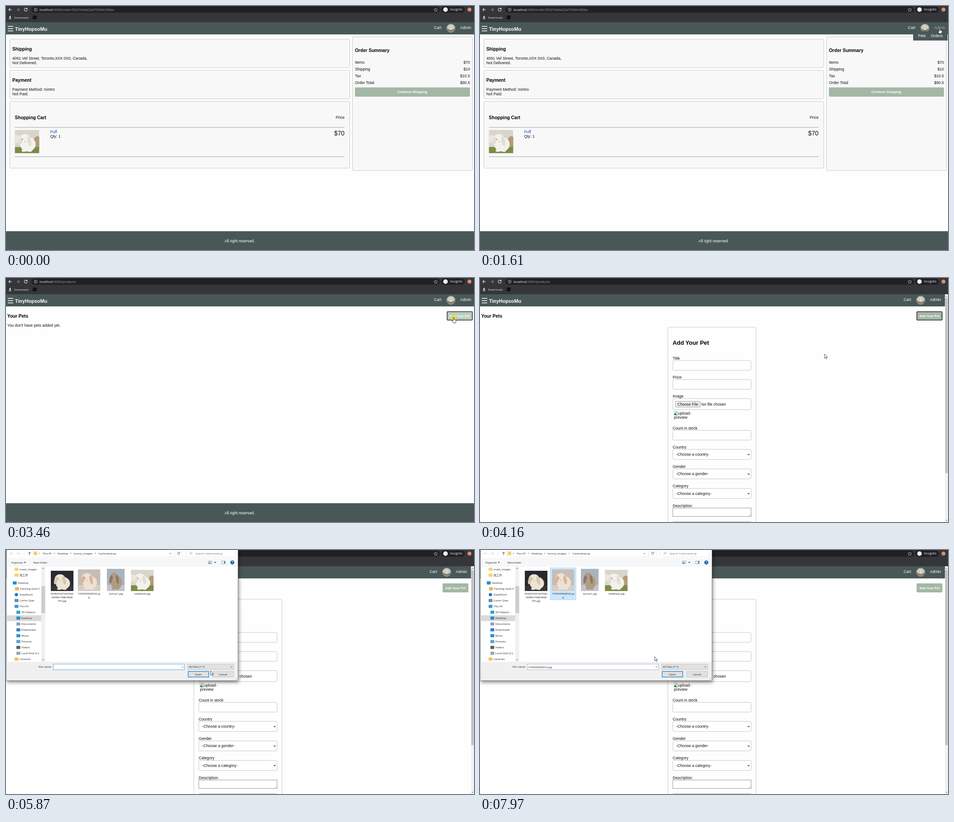
Write an HTML page that moves like this. It is 1034 px wide and 541 px high and loops after 8000 ms.

```html
<!DOCTYPE html>
<html lang="en">
<head>
<meta charset="utf-8">
<title>Pet shop admin walkthrough</title>
<style>
  html, body { margin: 0; width: 100%; height: 100%; overflow: hidden; background: #fefefe; }
  svg { display: block; }
  #stage { width: 100vw; height: 100vh; }
  text { font-family: "Liberation Sans", Arial, sans-serif; white-space: pre; }
  .ui { font-family: "Open Sans", "Noto Sans", "Noto Sans CJK SC", sans-serif; }
  #dialog { filter: drop-shadow(1px 3px 4px #0008); }
</style>
</head>
<body>
<svg id="stage" viewBox="0 0 1034 541" preserveAspectRatio="none"></svg>
<script>
const LOOP = 8000, TICK = 77.5;
const BODY = 8.62, H3 = 10.08, SMALL = 7.18;
const SLATE = '#495857', SAGE = '#a3b7a5';

// Markup helpers
const rect = (x, y, w, h, fill, more = '') =>
  `<rect x="${x}" y="${y}" width="${w}" height="${h}" fill="${fill}" ${more}/>`;
const box = (x, y, w, h, fill, stroke, r = 0, sw = .6) =>
  rect(x, y, w, h, fill, `stroke="${stroke}" stroke-width="${sw}" rx="${r}"`);
const text = (x, y, str, size = BODY, fill = '#111', more = '') =>
  `<text x="${x}" y="${y}" font-size="${size}" fill="${fill}" ${more}>${str}</text>`;
const bold = (x, y, str, size = H3, fill = '#000', more = '') =>
  text(x, y, str, size, fill, 'font-weight="700" ' + more);
const ui = (x, y, str, size = 6.1, fill = '#222', more = '') =>
  text(x, y, str, size, fill, 'class="ui" ' + more);
const line = (d, stroke, w = 1, more = '') =>
  `<path d="${d}" fill="none" stroke="${stroke}" stroke-width="${w}" ${more}/>`;
const shape = (d, fill, more = '') => `<path d="${d}" fill="${fill}" ${more}/>`;
const circle = (x, y, r, fill, more = '') => `<circle cx="${x}" cy="${y}" r="${r}" fill="${fill}" ${more}/>`;
const oval = (x, y, rx, ry, fill, turn = 0) =>
  `<ellipse cx="${x}" cy="${y}" rx="${rx}" ry="${ry}" fill="${fill}" transform="rotate(${turn} ${x} ${y})"/>`;
const group = (id, ...parts) => `<g id="${id}">${parts.join('')}</g>`;
const END = 'text-anchor="end"', MID = 'text-anchor="middle"';
const chevron = (x, y, color = '#444', w = .9) => line(`M${x - 2} ${y - 1}l2 2 2-2`, color, w);

// Flat rabbit picture on a 54 x 52 canvas
const photo = (x, y, w, h, back, floor, fur, shade, extra = '') =>
  `<svg x="${x}" y="${y}" width="${w}" height="${h}" viewBox="0 0 54 52" preserveAspectRatio="none">` +
  rect(0, 0, 54, 52, back) + extra + rect(0, 38, 54, 14, floor) +
  oval(29, 32, 17, 16, fur) + oval(22, 22, 13, 13, fur) +
  oval(12, 25, 4, 10, shade, 15) + oval(32, 25, 4, 11, shade, -12) +
  oval(20, 46, 5, 3, fur) + oval(33, 46, 5, 3, fur) +
  circle(17, 21, 1, '#544') + oval(22, 26, 1.5, 1, '#c9a79c') + '</svg>';
const whiteRabbit = (x, y, w, h) => photo(x, y, w, h, '#d8d5cb', '#7d8b45', '#f3f1ec', '#e2ded5',
  oval(50, 28, 9, 14, '#b49a78') + oval(5, 20, 9, 9, '#e8e6df'));

const browserBar = () => rect(0, 0, 1034, 36, '#35363a') +
  rect(56, 1, 903, 14, '#202124', 'rx="7"') + rect(961, 1, 53, 14, '#202124', 'rx="7"') +
  line('M13 8H6m3.4-3.4L6 8l3.4 3.4', '#e8eaed', 1.1) +
  line('M23 8h7m-3.4-3.4L30 8l-3.4 3.4', '#85868a', 1.1) +
  line('M46.3 5.8a3.4 3.4 0 1 0 .7 3.2', '#e8eaed', 1.1) + shape('M47.4 4v3.4H44z', '#e8eaed') +
  circle(65.5, 8, 3.3, 'none', 'stroke="#dadce0" stroke-width=".8"') + line('M65.5 7.3v2.5m0-4v.9', '#dadce0', .8) +
  shape('M949.5 4.2l1.2 2.7 3 .3-2.2 2 .6 2.9-2.6-1.5-2.6 1.5.6-2.9-2.2-2 3-.3z', 'none', 'stroke="#dadce0" stroke-width=".7"') +
  circle(971, 8, 5, '#f1f3f4') + ui(981, 10.3, 'Incognito', 6.3, '#f1f3f4') + circle(1024, 8, 4.4, '#e58a6c') +
  shape('M8 22h2v2.6h1.8L9 27.4 6.2 24.6H8zM6 28h6v1H6z', '#e8eaed') +
  ui(18, 27.7, 'Downloads', 6.12, '#e8eaed') + rect(59, 21, 8.5, 8.5, '#111');
const address = (id, path) => group(id,
  ui(74, 10.7, `<tspan fill="#f1f3f4">localhost</tspan>:3000/${path}`, 7.15, '#9aa0a6'));

const navRight = () => group('navRight',
  text(945.5, 51.3, 'Cart', BODY, '#fff'),
  circle(983, 49.2, 9.6, '#b9b7ae') + oval(983, 52, 8.7, 5.6, '#827e70') + oval(983, 48, 7, 5, '#d9d7d0') +
  circle(980, 48, .8, '#555') + circle(986, 48, .8, '#555'),
  text(1003.5, 51.3, 'Admin', BODY, '#fff', 'id="admin"'));

const card = (x, y, w, h) => box(x, y, w, h, '#f8f8f8', '#bcbcbc', 2.7, .8);
const summaryRow = (label, price, i) =>
  text(771, 127.8 + 15.1 * i, label) + text(1025, 127.8 + 15.1 * i, price, BODY, '#111', END);
const orderPage = () => group('orderPage',
  card(8.5, 73.5, 751, 63), card(8.5, 142.5, 751, 63.5), card(8.5, 211.5, 751, 148), card(765.5, 68.5, 265, 296.5),
  bold(14, 99, 'Shipping'), text(14, 119, '4091 Vel Street, Toronto,X0X 0X0, Canada,'), text(14, 128.8, 'Not Delivered.'),
  bold(14, 167.8, 'Payment'), text(14, 188.2, 'Payment Method: mintro'), text(14, 198, 'Not Paid.'),
  bold(19.5, 251, 'Shopping Cart'), text(748, 250.3, 'Price', BODY, '#111', END),
  line('M19.5 269.2H748M19.5 334.2H748', '#777', .7),
  whiteRabbit(19.5, 275, 54, 51.5),
  text(97.5, 282.4, 'Puff', BODY, '#1a45c4'), text(97.5, 292.2, 'Qty: 1'),
  text(748, 287.2, '$70', 13.79, '#111', END),
  bold(771, 102, 'Order Summary'),
  [['Items', '$70'], ['Shipping', '$10'], ['Tax', '$10.5'], ['Order Total', '$90.5']]
    .map(([label, price], i) => summaryRow(label, price, i)).join(''),
  rect(771, 180.5, 254, 20.5, SAGE, 'rx="2"'),
  bold(897.7, 193.2, 'Continue Shopping', SMALL, '#fff', MID));

const loading = () => {
  const ink = `stroke="${SAGE}" stroke-width="1.5" stroke-linecap="round"`;
  return group('loading',
    shape('M461 246.5V152q0-3 3-3h63q3 0 3 3v94.5z', '#a8bba9'),
    ui(468, 190.5, 'Loading', 15, '#fff'),
    shape('M531 246C526 220 530 203 540 208L570 208C576 216 582 230 586 246z', '#fefefe'),
    shape('M530 184C534 170 550 166 561 171C571 177 566 186 572 190C576 199 570 211 550 212L536 208z', '#fefefe', ink),
    shape('M532 180C524 197 518 222 513 237C511 247 524 249 531 239C540 225 544 206 538 187', '#fefefe', ink),
    line('M552 195q3 2 5-1M564 190l3-2M549 217q7 7 13 3q4-6-10-2M567 209q6 7 2 9M571 211q10 6 10 21q7 0 4 14M533 238q0 5 3 8M565 242q5-10 10-5q-5 4-4 9M578 246q4-11 9-14', SAGE, 1.3));
};

const addButton = () => group('addButton',
  rect(974, 74, 57, 20, SAGE, 'rx="2" id="addFace"'),
  bold(1002.3, 86.7, 'Add Your Pet', SMALL, '#fff', MID),
  box(974.6, 74.6, 55.8, 18.8, 'none', '#111', 1.5, 1.3).replace('<rect', '<rect id="addFocus"'));

const field = (label, y, h, content = '') =>
  text(425.7, y - 2.3, label) + box(426, y, 173, h, '#fff', '#b5b5b5', 2.4, .8) + content;
const select = (label, y, hint) => field(label, y, 22.3, text(433.5, y + 14, hint) + chevron(593.5, y + 11.5, '#222', 1.2));
const formPage = () => group('formPage',
  rect(0, 495, 1034, 46, '#fefefe'),
  box(415, 109.2, 195, 450, '#fefefe', '#bcbcbc', 2.7, .8),
  bold(425.5, 148.3, 'Add Your Pet', 12.92),
  field('Title', 183, 21.5), field('Price', 225.3, 21.5),
  field('Image', 267.5, 24.5, box(432, 273.4, 54.5, 12.8, '#efefef', '#777', 1, .7).replace('<rect', '<rect id="chooseFile"') +
    text(436, 282.7, 'Choose File') + text(489, 282.7, 'No file chosen')),
  box(428.7, 295.3, 8, 9, '#eef4fb', '#999', 0, .6), shape('M429 304v-3l3-2.5 4 5.5z', '#4f9a4a'), circle(434.3, 297.8, 1.2, '#7eb1e0'),
  text(437.5, 302.8, 'upload-'), text(428.5, 312.2, 'preview'),
  field('Count in stock', 337.8, 21.5),
  select('Country', 379.9, '-Choose a country-'), select('Gender', 423.2, '-Choose a gender-'),
  select('Category', 466.5, '-Choose a category-'),
  text(425.7, 507.5, 'Description'), box(426, 510, 173, 18.8, '#fff', '#777', 0, .8), line('M594 527.5l4-4m-2 4l2-2', '#777', .5),
  rect(426, 540, 173, 20, SAGE, 'rx="2"'),
  rect(1027.3, 36, 6.7, 505, '#f1f1f1'), rect(1028, 44.5, 5.4, 388, '#c1c1c1'),
  shape('M1029 41.5l1.7-2 1.7 2zM1029 536.5l1.7 2 1.7-2z', '#555'));

const places = [
  [19, 'mask_images', '#f5d36b'], [19, '找工作', '#f5d36b'], [15, 'Desktop', '#1e8fd8'],
  [20, 'Painting Vault F', '#e8b64c'], [19, 'DataPerch', '#1573c9'], [19, 'Lumin Qiao', '#6b8f9b'],
  [19, 'This PC', '#3d9bdc'], [23, '3D Objects', '#2fa3d6'], [23, 'Desktop', '#1e8fd8'],
  [23, 'Documents', '#8fa3b3'], [23, 'Downloads', '#2c7fd0'], [23, 'Music', '#2f8fdc'],
  [23, 'Pictures', '#5a9fd0'], [23, 'Videos', '#5b6068'], [23, 'Local Disk (C:)', '#9aa5ad'], [19, 'Libraries', '#efc44f']];
const sidebar = () => rect(1, 144.8, 77, 12.8, '#d9d9d9') + places.map(([x, name, color], i) => {
  const y = 42.8 + 13 * i + (i > 1 ? 4.2 : 0);
  const icon = name === 'DataPerch' ? circle(x + 4, y, 3.6, color) : rect(x, y - 3.5, 8.5, 7, color, 'rx=".8"');
  return icon + ui(x + 11, y + 2.2, name);
}).join('') +
  rect(78, 37, 8.5, 211, '#f0f0f0') + rect(78, 80, 8.5, 60, '#cdcdcd') +
  line('M80 42l2-2 2 2M80 242l2 2 2-2', '#555', .9);
const caption = (x, lines) => lines.map((s, i) => ui(x, 99.2 + 8.1 * i, s, 5.85, '#222', MID)).join('');
const dialog = () => group('dialog',
  box(1, -3, 511.5, 292.3, '#fff', '#777', 0, .8),
  line('M16 7.5H9m3-3-3 3 3 3M23 7.5h7m-3-3 3 3-3 3', '#ccc', .9), chevron(41, 7.5, '#ccc'),
  line('M52 11.5V4.5m-3 3 3-3 3 3', '#444', 1),
  box(59.5, -3, 330, 18.5, '#fff', '#d9d9d9'), rect(61.5, 3.5, 7.5, 8, '#f2cf65', 'rx=".8"'),
  [74, 107.5, 143.5, 197].map(x => line(`M${x - 1} 5.8l1.7 1.8-1.7 1.8`, '#555', .8)).join(''),
  ui(81, 9.8, 'This PC'), ui(114, 9.8, 'Desktop'), ui(150, 9.8, 'bunny_images'), ui(204, 9.8, 'CashmereLop'),
  chevron(363.5, 7.8), line('M372.5 0v15.5', '#d9d9d9', .7), line('M383 5.7a2.6 2.6 0 1 0 .8 2m.2-3.3v2h-2', '#444', .8),
  box(397, -3, 109, 18.5, '#fff', '#d9d9d9'), circle(409, 6.7, 2, 'none', 'stroke="#888" stroke-width=".7"'),
  line('M407.5 8.3l-2.5 2.5', '#888', .7), ui(419, 9.8, 'Search CashmereLop', 6.06, '#6d6d6d'),
  rect(1.5, 18, 510.5, 19, '#f6f7f8'), ui(11.5, 29.7, 'Organize'), ui(60.5, 29.7, 'New folder'),
  shape('M39.5 26.5h4.6l-2.3 2.6zM460 26.5h4.6l-2.3 2.6z', '#333'),
  box(447, 24.5, 7.5, 6, '#dcebf5', '#678'), rect(448.5, 27, 3, 3, '#3b8bc9'),
  box(476.5, 24.5, 8, 6, '#fff', '#678'), rect(481.5, 24.5, 3, 6, '#5b90bd'),
  circle(500, 27.6, 4.4, '#1560b8'), ui(500, 30, '?', 6.4, '#fff', 'text-anchor="middle" font-weight="700"'),
  sidebar(),
  rect(155, 39.5, 57, 71, '#e5f3ff', 'id="fileTile"'),
  photo(99, 46, 50, 45, '#292a30', '#35353a', '#ece5d6', '#d6c7a8'),
  photo(158.5, 43, 50, 48, '#c4bdb8', '#d5cec7', '#eee0d2', '#d9b797'),
  photo(223, 41.5, 39, 49.5, '#a9b4bf', '#c3c5c8', '#b19b85', '#8f7761'),
  whiteRabbit(276, 44, 50, 47),
  caption(124, ['854655437e935d2', 'd4960c768b38d6', '5f3.jpg']), caption(183.5, ['1595569008542.jp', 'g']),
  caption(243, ['bunny1.jpg']), caption(301.5, ['sddefault.jpg']),
  rect(1.5, 248, 510.5, 41, '#f0f0f0'),
  ui(101, 261.3, 'File name:', 6.1, '#222', END),
  box(104.3, 253, 290.4, 12.5, '#fff', '#0078d7').replace('<rect', '<rect id="nameBox"'), chevron(390, 259.5),
  ui(106, 261.6, '1595569008542.jpg', 5.82, '#222', 'id="fileName"'),
  box(401.5, 253, 101.5, 12, '#e1e1e1', '#adadad'), ui(404, 261.3, 'All Files (*.*)'), chevron(498, 259.3),
  box(402.5, 269.3, 45.5, 12.3, '#e1e1e1', '#0078d7', 0, 1.2), ui(425, 277.5, 'Open', 6.1, '#222', MID),
  box(456.3, 269.3, 46.5, 12.3, '#e1e1e1', '#adadad'), ui(479.5, 277.5, 'Cancel', 6.1, '#222', MID),
  line('M507 287.5l4-4m-2 4l2-2', '#aaa', .7));

const cursor = () => group('cursor',
  circle(0, 1, 6, '#e9dc32', 'id="click" opacity=".85"'),
  shape('M0 0V9.2L2.1 7.3 3.6 10.7 5.1 10 3.6 6.8H6.6Z', '#fff', 'id="arrow" stroke="#111" stroke-width=".7"'),
  shape('M-1 .6q1-1.2 2 0v4l3.2.9q1.3.5 1.2 1.8l-.8 4.8H-.7L-3.6 7.8q-.2-1.5 1.3-1.1L-1 8z', '#fff', 'id="hand" stroke="#111" stroke-width=".8"'),
  circle(8, .8, 3.4, '#d5efff', 'id="busy" stroke="#1b8ad3" stroke-width="2"'));

document.getElementById('stage').innerHTML = [
  rect(0, 0, 1034, 541, '#fefefe'), browserBar(),
  address('orderUrl', 'order/5f3274d4d22ef70004c583ec'), address('productsUrl', 'products'),
  rect(0, 36, 1034, 27, SLATE), line('M4 45.3h12M4 50.3h12M4 55.3h12', '#fff', 1.5),
  bold(20, 55.4, 'TinyHopsoMu', 10.77, '#fff'),
  rect(0, 499.3, 1034, 42, SLATE), text(516.5, 523.5, 'All right reserved.', BODY, '#fff', MID),
  orderPage(),
  group('productsPage', bold(2.7, 87.6, 'Your Pets'), addButton()),
  loading(), group('empty', text(2.7, 107.6, "You don't have pets added yet.")),
  formPage(), navRight(),
  group('menu', rect(957, 56, 76, 20.5, SLATE), text(967.7, 68.8, 'Pets', BODY, '#fff', 'id="pets"'), text(996, 68.8, 'Orders', BODY, '#fff')),
  group('status', shape('M0 531.5H71q2 0 2 2V541H0z', '#3c3d41'), ui(-.5, 539.2, 'localhost:3000/products', 6.12, '#c3c5c8')),
  dialog(), cursor()
].join('');

const part = {};
document.querySelectorAll('#stage [id]').forEach(el => part[el.id] = el);

// Pointer path: time, x, y
const path = [
  [370, 1020, 532], [680, 1002, 260], [910, 1012, 118], [990, 1031, 130],
  [1222, 1028, 62], [1300, 1021, 56], [1610, 1015.5, 49], [1690, 1015.5, 49],
  [2000, 976, 68.5], [2540, 976, 68.5], [3080, 989, 87.5], [3780, 989, 87.5],
  [4632, 462, 275.5], [5790, 462, 275.5], [6492, 202.5, 73.5], [6640, 179.5, 59.5],
  [7270, 179.5, 59.5], [7430, 264, 62], [7510, 264, 62], [7965, 386, 236.5]];

function pointerAt(t) {
  const i = path.findIndex(key => key[0] > t);
  if (i < 1) return path[i < 0 ? path.length - 1 : 0].slice(1);
  const [a, b] = [path[i - 1], path[i]];
  const u = (t - a[0]) / (b[0] - a[0]), e = u * u * (3 - 2 * u);
  return [1, 2].map(n => a[n] + (b[n] - a[n]) * e);
}

function render(now) {
  const raw = now % LOOP;
  const t = raw < 358 ? 0 : 370 + TICK * Math.floor((raw - 358) / TICK);
  const during = (...spans) => spans.some(([from, to = LOOP]) => t >= from && t < to);
  const show = (id, ...spans) => { part[id].style.display = during(...spans) ? '' : 'none'; };
  const fill = (id, on, off, ...spans) => part[id].setAttribute('fill', during(...spans) ? on : off);

  show('orderUrl', [0, 2140]);
  show('productsUrl', [2140]);
  show('orderPage', [0, 2140]);
  show('productsPage', [2140]);
  show('loading', [2220, 2840]);
  show('empty', [2840, 3535]);
  show('formPage', [3535]);
  show('menu', [1290, 2760]);
  show('status', [1900, 2760]);
  fill('admin', '#a3abaa', '#fff', [1290, 1830]);
  fill('pets', '#a3abaa', '#fff', [1830, 2760]);
  fill('addFace', '#bccdbe', SAGE, [2840, 3930]);
  show('addFocus', [3455, 5010]);
  fill('chooseFile', '#dedede', '#efefef', [4550, 5550]);
  part.chooseFile.setAttribute('stroke', during([5010]) ? '#222' : '#777');
  const shift = during([3535]) ? 'translate(-9.4 0)' : '';
  part.navRight.setAttribute('transform', shift);
  part.addButton.setAttribute('transform', shift);

  show('dialog', [5480]);
  part.dialog.style.opacity = during([5480, 5555]) ? .6 : 1;
  const selected = during([7340]);
  part.fileTile.setAttribute('fill', selected ? '#cce8ff' : '#e5f3ff');
  part.fileTile.setAttribute('stroke', selected ? '#99d1ff' : 'none');
  part.fileTile.setAttribute('stroke-width', .8);
  show('fileTile', [6400]);
  show('fileName', [7030]);
  part.nameBox.setAttribute('stroke', during([7580]) ? '#6f94b5' : '#0078d7');

  show('cursor', [365, 985], [1215]);
  show('hand', [1290, 3930]);
  show('arrow', [0, 1290], [3930]);
  show('busy', [5400, 5555]);
  show('click', [2140, 2380], [3455, 3850], [5010, 5245], [7030, 7340]);
  part.cursor.setAttribute('transform', `translate(${pointerAt(t).join(' ')})`);
}

const start = performance.now();
(function frame() {
  render(performance.now() - start);
  requestAnimationFrame(frame);
})();
</script>
</body>
</html>
```
